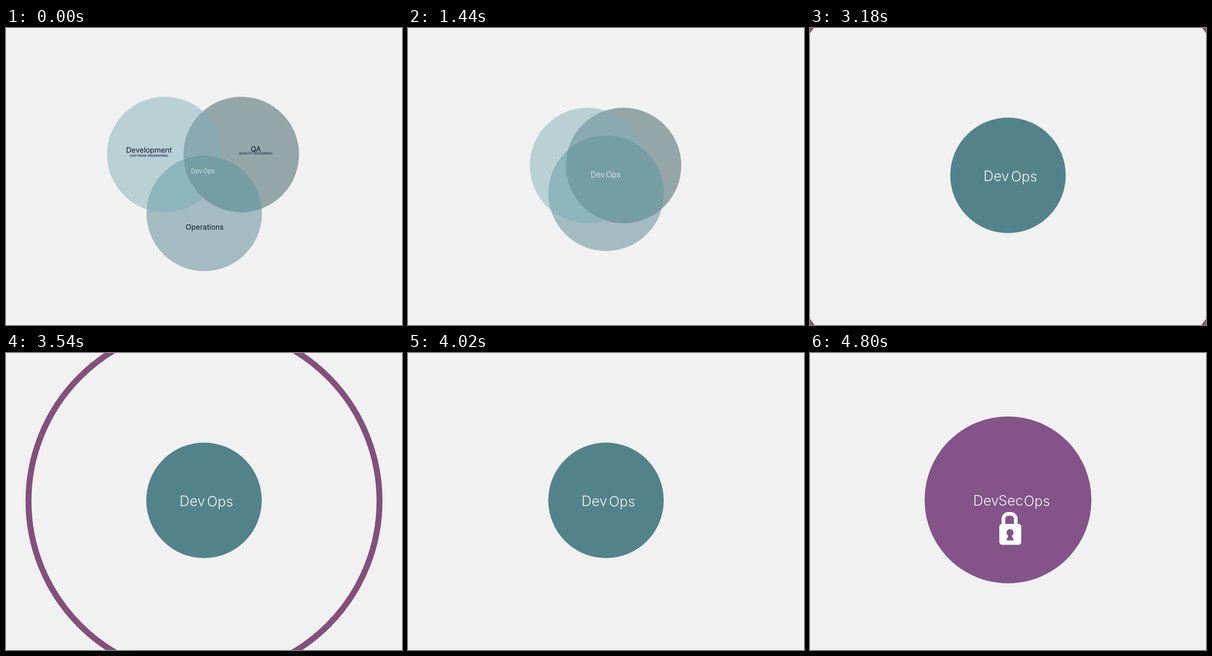
Recreate the animation shown at these times as an HTML page. Size 864 by 648 pixels, loop 6.3 s.

```html
<!DOCTYPE html>
<html lang="en">
<head>
<meta charset="utf-8">
<title>DevSecOps</title>
<style>
  html, body { margin: 0; width: 100%; height: 100%; overflow: hidden; background: #f1f1f1; }
  svg { display: block; width: 100%; height: 100%; font-family: Inter, Lato, sans-serif; }
  text { text-anchor: middle; }
  #labels { fill: #10142a; font-size: 16px; }
  #labels .sub { fill: #1a1f4a; font-size: 6.3px; font-weight: 500; }
  #words { fill: #f1f2f3; font-weight: 300; }
</style>
</head>
<body>
<svg viewBox="0 0 864 648">
  <defs>
    <clipPath id="clipDev"><circle class="dev" r="126"/></clipPath>
    <clipPath id="clipQa"><circle class="qa" r="126"/></clipPath>
  </defs>
  <circle id="ring" cx="432" cy="323" fill="none" stroke="#83507c" stroke-width="13"/>
  <g id="venn">
    <circle class="dev" r="126" fill="#b9d0d5"/>
    <circle class="qa" r="126" fill="#95a6a8"/>
    <circle class="ops" r="126" fill="#a3bbc1"/>
    <g clip-path="url(#clipDev)">
      <circle class="qa" r="126" fill="#88aab0"/>
      <circle class="ops" r="126" fill="#8fb5bc"/>
    </g>
    <g clip-path="url(#clipQa)"><circle class="ops" r="126" fill="#759da3"/></g>
  </g>
  <circle id="disc" cx="432"/>
  <g id="labels">
    <text x="312" y="272">Development</text>
    <text class="sub" x="312" y="281">(SOFTWARE ENGINEERING)</text>
    <text x="545" y="270">QA</text>
    <text class="sub" x="545" y="276">(QUALITY ASSURANCE)</text>
    <text x="433.5" y="440">Operations</text>
  </g>
  <g id="words">
    <text id="wDev">Dev</text>
    <text id="wSec" x="438">Sec</text>
    <text id="wOps">Ops</text>
  </g>
  <g id="lock">
    <path d="M422 376V362a11 11 0 0 1 11-11h5a11 11 0 0 1 11 11v14" fill="none" stroke="#fff" stroke-width="8"/>
    <rect x="413" y="373" width="48" height="45.5" rx="6" fill="#fff"/>
    <g fill="#84538a">
      <circle cx="436.5" cy="392" r="7.7"/>
      <path d="M434 396h5l5 11q.5 2-1.500 2h-12q-2 0-1.500-2z"/>
    </g>
  </g>
</svg>
<script>
const LOOP = 6300, STEP = 60;
const HOME = { dev: [346.3, 276], qa: [513.4, 276], ops: [432.5, 404.5] };
const CENTER = [432, 321.5];
const TEAL = [83, 131, 138], PURPLE = [132, 83, 138];

const $ = id => document.getElementById(id);
const set = (el, attrs) => { for (const k in attrs) el.setAttribute(k, attrs[k]); };
const lerp = (a, b, p) => a + (b - a) * p;
const span = (t, from, to) => Math.min(1, Math.max(0, (t - from) / (to - from)));
const inOut = (x, n = 2.3) => x < .5 ? (2 * x) ** n / 2 : 1 - (2 - 2 * x) ** n / 2;

function draw(t) {
  const merge = inOut(span(t, 934, 1920));
  const grow = inOut(span(t, 4020, 4440));

  for (const name in HOME) {
    const [cx, cy] = HOME[name].map((v, i) => lerp(v, CENTER[i], merge));
    document.querySelectorAll('.' + name).forEach(c => set(c, { cx, cy }));
  }
  set($('venn'), { opacity: t < 1920 ? 1 : 0 });
  set($('labels'), { opacity: 1 - span(t, 920, 1340) });

  set($('disc'), {
    cy: lerp(321.5, 320.5, grow),
    r: lerp(126, 182, grow),
    opacity: span(t, 1560, 1920),
    fill: `rgb(${TEAL.map((v, i) => Math.round(lerp(v, PURPLE[i], grow)))})`
  });

  // the word grows later than it moves
  const zoom = merge ** 2.5;
  const base = lerp(316.7, 333.7, merge) - grow;
  set($('words'), { 'font-size': lerp(13.6, 30.5, zoom) });
  set($('wDev'), { x: lerp(lerp(416, 406.5, zoom), 384, grow), y: base });
  set($('wOps'), { x: lerp(lerp(443, 467, zoom), 495, grow), y: base + merge });
  set($('wSec'), { y: base, opacity: span(grow, .4, 1) });

  // accelerating ring, ends behind the disc
  const s = (t - 3180) / STEP;
  const r = 539 - 19.8 * s - 1.035 * s * s;
  set($('ring'), { r: Math.max(0, r), opacity: t >= 3180 && r > 100 ? 1 : 0 });

  const swing = (1 - span(t, 4500, 4800)) ** 1.5;
  set($('lock'), {
    opacity: span(t, 4380, 4500),
    transform: `translate(${3 * swing} 0) rotate(${-22 * swing} 437 383)`
  });
}

const start = performance.now();
function tick() {
  const t = (performance.now() - start) % LOOP;
  draw(Math.floor(t / STEP) * STEP);
  requestAnimationFrame(tick);
}
tick();
</script>
</body>
</html>
```
